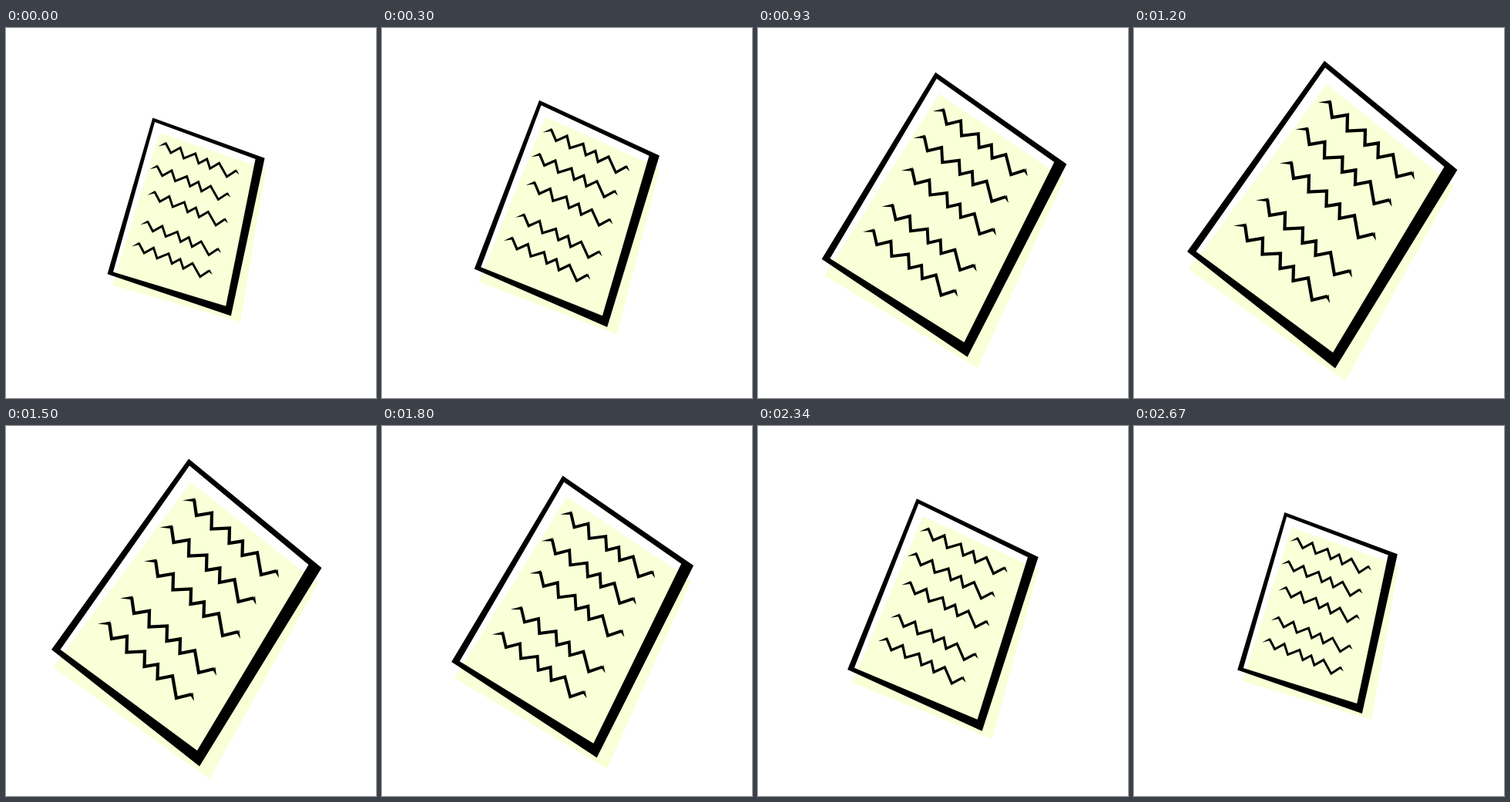
Write an HTML page that moves like this. It is 480 px wide and 480 px high and loops after 2.7 s.

```html
<!DOCTYPE html>
<html lang="en">
<head>
<meta charset="utf-8">
<title>Wobbling page</title>
<style>
  html, body { margin: 0; width: 100%; height: 100%; overflow: hidden; background: #fff; }
  svg { display: block; width: 100%; height: 100%; }
</style>
</head>
<body>
<svg viewBox="0 0 480 480">
  <defs>
    <g id="line">
      <path fill="none" stroke="#000" stroke-width="4.2" stroke-miterlimit="8"
        d="M254 95.3 257 116 277 112.7 276.5 133.5 300 132.5 299.5 152 317 149.3 316.5 168 336 164.3 341 193 361 188"/>
      <path d="M239 96.5 256 93.4 252.5 98ZM362.5 185.5 364 197 359.5 190Z"/>
    </g>
  </defs>
  <g id="page">
    <!-- drawn tilted and enlarged, brought back to the resting pose here -->
    <g transform="scale(.6923) rotate(-19.556) translate(-249 -239.5)">
      <path fill="#f9ffd6" d="M250 73 414.5 204.5 274 458 71 313Z"/>
      <path fill-rule="evenodd" d="M247 42.5 419.5 184 261 441.5 69 290ZM248 51.5 402.5 180 258 421 80.5 290Z"/>
      <use href="#line"/>
      <use href="#line" x="-29.5" y="35"/>
      <use href="#line" x="-50" y="79"/>
      <use href="#line" x="-81" y="127"/>
      <use href="#line" x="-110" y="160"/>
    </g>
  </g>
</svg>
<script>
  const STEP = 30, COUNT = 90, HALF = COUNT / 2;
  const page = document.getElementById('page');

  // Drift of the page centre: step, x, y
  const drift = [
    [0, 237.25, 244.5], [18, 246.8, 237.9], [21, 245.5, 242], [36, 246.8, 239.4],
    [40, 249, 239.5], [45, 243, 237.3], [50, 239, 239.5], [54, 243.8, 242.4],
    [60, 251.75, 245.5], [72, 249.9, 241.9], [78, 244, 244], [89, 241.75, 242]
  ];

  const slope = (i, axis) =>
    (drift[i + 1][axis] - drift[i][axis]) / (drift[i + 1][0] - drift[i][0]);

  // Flat at turning points, so the curve never overshoots
  function tangent(i, axis) {
    if (i === 0) return slope(0, axis);
    if (i === drift.length - 1) return slope(i - 1, axis);
    const a = slope(i - 1, axis), b = slope(i, axis);
    return a * b > 0 ? 2 * a * b / (a + b) : 0;
  }

  function position(n, axis) {
    let i = 0;
    while (i < drift.length - 2 && n > drift[i + 1][0]) i++;
    const from = drift[i], to = drift[i + 1];
    const span = to[0] - from[0], u = (n - from[0]) / span, v = 1 - u;
    return v * v * (1 + 2 * u) * from[axis] + u * u * (1 + 2 * v) * to[axis]
      + u * v * span * (v * tangent(i, axis) - u * tangent(i + 1, axis));
  }

  function draw(time) {
    const n = Math.floor(time / STEP) % COUNT;
    const k = 1 - Math.abs(1 - n / HALF);
    page.setAttribute('transform',
      `translate(${position(n, 1)} ${position(n, 2)}) rotate(${22 * k}) scale(${1 + k / 2})`);
  }

  const start = performance.now();
  function tick() {
    draw(performance.now() - start);
    requestAnimationFrame(tick);
  }
  tick();
</script>
</body>
</html>
```
